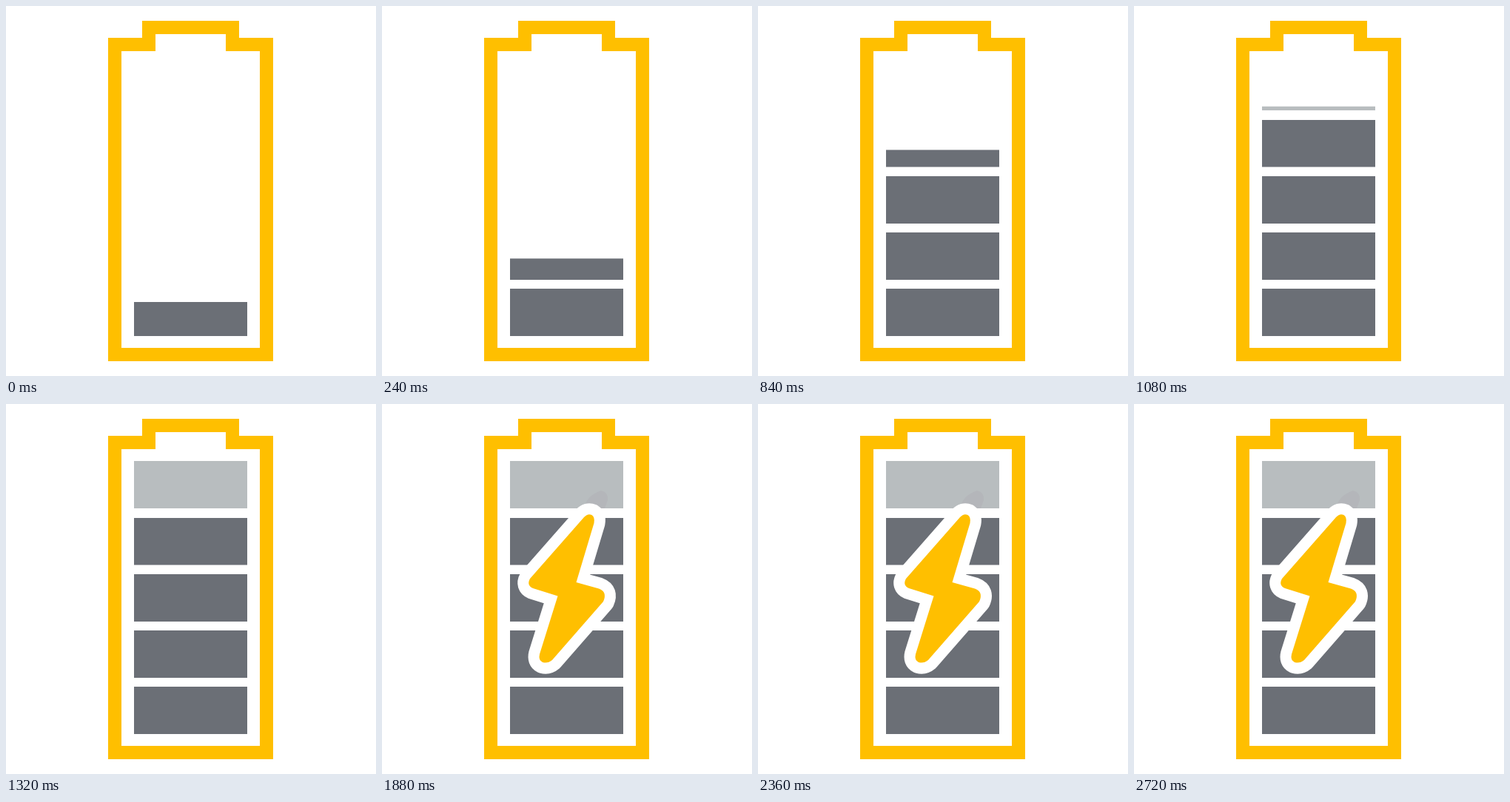
Recreate the animation shown at these times as an HTML page. Size 500 by 500 pixels, loop 3000 ms.

```html
<!DOCTYPE html>
<html lang="en">
<head>
<meta charset="utf-8">
<title>Charging battery</title>
<style>
  html, body { margin: 0; width: 100%; height: 100%; overflow: hidden; background: #fff; }
  svg { display: block; width: 100%; height: 100%; }
  .case { fill: none; stroke: #ffbf00; stroke-width: 18; }
  .cells { fill: #6b6f76; }
  .cells .top { fill: #b8bdbf; }
  .cover { fill: #fff; animation: charge 3s infinite; }
  .bolt { visibility: hidden; animation: blink 3s step-end infinite; }
  .bolt .halo { fill: #fff; stroke: #fff; stroke-width: 30; stroke-linejoin: round; }
  .bolt .core { fill: #ffbf00; }
  .bolt .shade { fill: #b4b6ba; }

  /* The cover rises off the cells in 40 ms steps. */
  @keyframes charge {
    0% { transform: translateY(0); animation-timing-function: steps(33, end); }
    44%, 100% { transform: translateY(-323px); }
  }
  @keyframes blink {
    0% { visibility: hidden; }
    62.666% { visibility: visible; }
    74.666% { visibility: hidden; }
    78.666% { visibility: visible; }
    86.666% { visibility: hidden; }
    90.666%, 100% { visibility: visible; }
  }
</style>
</head>
<body>
<svg viewBox="0 0 500 500">
  <defs>
    <path id="flash" d="M273 153Q278 147.500 283.500 150Q288 153 286.500 161L262.500 241L293 249.500Q305 254 299 267L230 346Q224 351 217 349Q211 346 213 338L237.500 259.500L204 249Q195 245 200 236Z"/>
    <clipPath id="inside"><rect x="160" y="70" width="180" height="385"/></clipPath>
  </defs>
  <g class="cells">
    <rect class="top" x="173" y="77" width="153" height="64"/>
    <rect x="173" y="154" width="153" height="63.5"/>
    <rect x="173" y="230" width="153" height="64"/>
    <rect x="173" y="306" width="153" height="64"/>
    <rect x="173" y="382" width="153" height="64"/>
  </g>
  <g clip-path="url(#inside)">
    <rect class="cover" x="165" y="70" width="170" height="330"/>
  </g>
  <path class="case" d="M147 52H193V29H306V52H352V471H147Z"/>
  <g class="bolt">
    <path class="shade" d="M273 141Q276 124 296 117Q306 119 305 130L301 141Z"/>
    <use class="halo" href="#flash"/>
    <use class="core" href="#flash"/>
  </g>
</svg>
</body>
</html>
```
